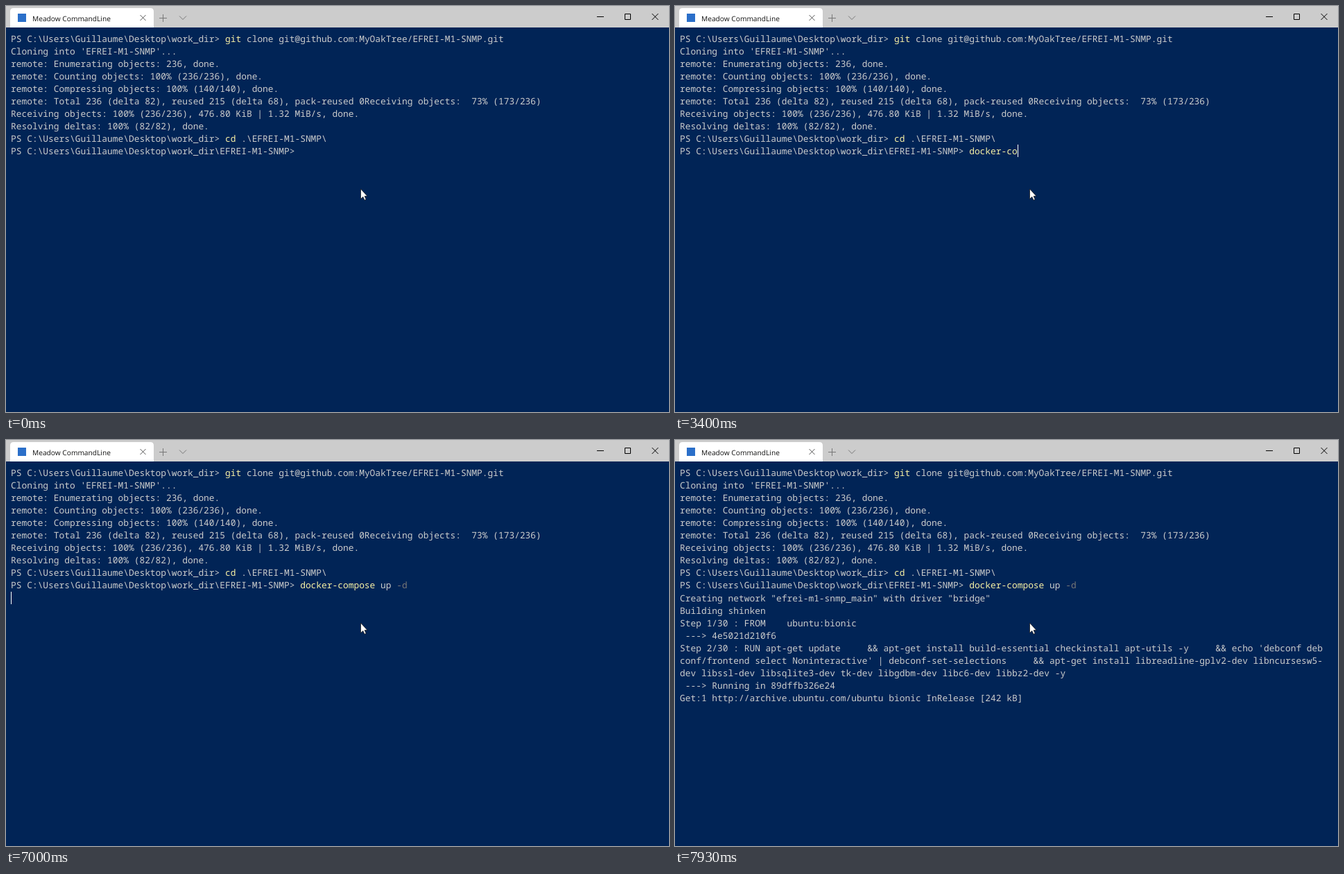
An HTML page that plays this animation: 956x586 px, repeating every 8 s.

```html
<!DOCTYPE html>
<html lang="en">
<head>
<meta charset="utf-8">
<title>Terminal</title>
<style>
html, body { margin: 0; width: 100%; height: 100%; overflow: hidden; background: #012456; }
svg { position: absolute; left: 0; top: 0; }
.row {
  position: absolute; left: 7px; height: 18px; margin: 0; color: #ccc; white-space: pre;
  font: 12.88px/18px "Noto Sans Mono", monospace;
  font-variant-ligatures: none; text-rendering: geometricPrecision;
}
.cmd { color: #f9f1a5; }
.key { color: #16c60c; }
.err { color: #e74856; }
.opt { color: #767676; }
#caret { position: absolute; width: 1px; height: 18px; background: #fff; }
</style>
</head>
<body>
<svg width="956" height="586" fill="none">
  <path fill="#ccc" d="M0 0H956V31H0Z"/>
  <path fill="#fff" d="M6 31V8Q6 3 11 3H208Q213 3 213 8V31Z"/>
  <rect x="17" y="11" width="12" height="12" fill="#2b6fc9"/>
  <text x="38" y="21.5" fill="#111" font-family="'Open Sans', sans-serif" font-size="10.2" text-rendering="geometricPrecision">Meadow CommandLine</text>
  <path stroke="#555" d="M193.5 13l8 8m0-8l-8 8"/>
  <path stroke="#777" d="M221 17.5h11m-5.500-5.500v11M250 14.500l5 5 5-5"/>
  <path stroke="#000" d="M852 15.500h10M892.500 11.500h8v8h-8zM931.500 11l9 9m0-9l-9 9"/>
  <path fill="#fff" stroke="#111" stroke-width=".7" d="M511.500 264V278.500L514.800 275.400 517 280.300 519.200 279.300 517.100 274.600H521Z"/>
</svg>
<div id="screen"></div>
<div id="caret"></div>
<script>
const LOOP = 8000, CELL = 7.728, LINE = 18.05, TOP = 38;
const HOME = "PS C:\\Users\\Guillaume\\Desktop\\work_dir";
const PROMPT = HOME + "\\EFREI-M1-SNMP";
const span = (kind, text) => `<span class="${kind}">${text}</span>`;

// [time shown, text]
const lines = [
  [0, HOME + "&gt; " + span("cmd", "git") + " clone git@github.com:MyOakTree/EFREI-M1-SNMP.git"],
  [0, "Cloning into 'EFREI-M1-SNMP'..."],
  [0, "remote: Enumerating objects: 236, done."],
  [0, "remote: Counting objects: 100% (236/236), done."],
  [0, "remote: Compressing objects: 100% (140/140), done."],
  [0, "remote: Total 236 (delta 82), reused 215 (delta 68), pack-reused 0Receiving objects:  73% (173/236)"],
  [0, "Receiving objects: 100% (236/236), 476.80 KiB | 1.32 MiB/s, done."],
  [0, "Resolving deltas: 100% (82/82), done."],
  [0, HOME + "&gt; " + span("cmd", "cd") + " .\\EFREI-M1-SNMP\\"],
  [0, ""],
  [7070, 'Creating network "efrei-m1-snmp_main" with driver "bridge"'],
  [7270, "Building shinken"],
  [7330, "Step 1/30 : FROM    ubuntu:bionic"],
  [7400, " ---&gt; 4e5021d210f6"],
  [7400, "Step 2/30 : RUN apt-get update     &amp;&amp; apt-get install build-essential checkinstall apt-utils -y     &amp;&amp; echo 'debconf deb"],
  [7400, "conf/frontend select Noninteractive' | debconf-set-selections     &amp;&amp; apt-get install libreadline-gplv2-dev libncursesw5-"],
  [7400, "dev libssl-dev libsqlite3-dev tk-dev libgdbm-dev libc6-dev libbz2-dev -y"],
  [7400, " ---&gt; Running in 89dffb326e24"],
  [7930, "Get:1 http://archive.ubuntu.com/ubuntu bionic InRelease [242 kB]"]
];
const INPUT_ROW = 9;

const keys = "docker \b-compose up -d";
const keyTimes = [1200, 1400, 1530, 1600, 1730, 1870, 2130, 2600, 2930, 3200, 3400,
  3530, 3600, 3730, 3870, 4000, 4200, 4400, 4470, 5000, 5200, 5400];

const caretOff = [[0, 400], [930, 1200], [6470, 7000], [7530, LOOP]];
// [time, row, column] once the command has been entered
const caretStops = [[5930, 10, 0], [7070, 11, 0], [7270, 12, 0], [7330, 12, 33], [7400, 18, 0]];

const screen = document.getElementById("screen");
const caret = document.getElementById("caret");
const rows = lines.map(([, html], i) => {
  const row = document.createElement("pre");
  row.className = "row";
  row.style.top = TOP + i * LINE + "px";
  row.innerHTML = html;
  return screen.appendChild(row);
});

function typedAt(t) {
  let text = "";
  keyTimes.forEach((time, i) => {
    if (t >= time) text = keys[i] === "\b" ? text.slice(0, -1) : text + keys[i];
  });
  return text;
}

function inputHtml(text) {
  const keyword = text === "do";
  const [, command, rest, option] = text.match(/^(\S*)([^-]*)(.*)$/);
  return PROMPT + (keyword ? span("err", "&gt;") : "&gt;") + " " +
    span(keyword ? "key" : "cmd", command) + rest + span("opt", option);
}

let shown;
function draw(t) {
  const text = typedAt(t);
  if (text !== shown) rows[INPUT_ROW].innerHTML = inputHtml(shown = text);
  rows.forEach((row, i) => row.style.visibility = t >= lines[i][0] ? "visible" : "hidden");

  const stop = caretStops.filter(([time]) => t >= time).pop();
  const [, row, col] = stop || [0, INPUT_ROW, PROMPT.length + 2 + text.length];
  caret.style.left = Math.round(7 + col * CELL) + "px";
  caret.style.top = Math.round(TOP + row * LINE) + "px";
  caret.style.visibility = caretOff.some(([a, b]) => t >= a && t < b) ? "hidden" : "visible";
}

const start = performance.now();
function tick() {
  draw((performance.now() - start) % LOOP);
  requestAnimationFrame(tick);
}
tick();
</script>
</body>
</html>
```
